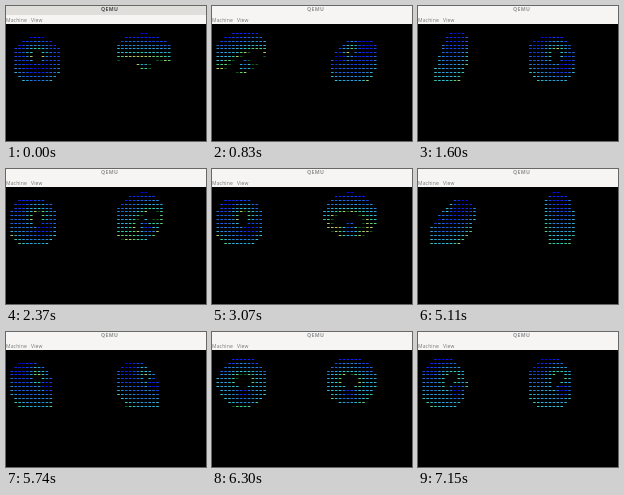
Write an HTML page with a canvas that moves like this. It is 200 px wide and 135 px high and loops after 7.22 s.

```html
<!DOCTYPE html>
<html lang="en">
<head>
<meta charset="utf-8">
<title>QEMU</title>
<style>
  html, body { margin: 0; width: 200px; height: 135px; overflow: hidden; background: #000; }
  body { position: relative; font-family: "Open Sans", "DejaVu Sans", sans-serif; }
  header, nav { position: absolute; left: 0; width: 200px; height: 9px; background: #f6f5f4; white-space: nowrap; }
  header { top: 0; font: bold 5.2px/7px "Open Sans", sans-serif; color: #929292; }
  header.active { background: #e0deda; color: #4a4a4a; }
  header span { position: absolute; left: 95px; letter-spacing: .35px; }
  nav { top: 9px; font-size: 5px; line-height: 11px; color: #777; }
  nav span { position: absolute; top: 0; left: 0; letter-spacing: .15px; }
  nav span + span { left: 25px; }
  canvas { position: absolute; left: 0; top: 18px; }
</style>
</head>
<body>
<header id="bar"><span>QEMU</span></header>
<nav><span>Machine</span><span>View</span></nav>
<canvas id="screen" width="200" height="117"></canvas>
<script>
const LOOP = 7220, STEP = 70, LAST = 102;
const CELL = 3.9, SCALE_X = 9.3, SCALE_Y = 9.4, MID_ROW = 9, TOP_ROW = 1, END_ROW = 14;
const SPIN_A = 0.3, SPIN_B = 0.13;
// dim to bright
const SHADES = ['#0c5a1c', '#b4cc68', '#5cd078', '#30cca4', '#30c4d4', '#2cb4d8',
                '#28a0d8', '#2484dc', '#1c64e4', '#1440ec', '#0c20f0', '#0404e4'];

// poses: [step, tilt, roll]; the left one stalls between steps 33 and 44
const donuts = [
  { x: 31.8, poses: [[0, .22, 3.14], [23, 1.42, 1.88], [33, .42, -1.8], [44, .42, -1.8],
                     [60, .68, .15], [73, 1.25, 2.25], [90, .2, -.25], [102, .64, -1.57]] },
  { x: 138.5, poses: [[0, 1.13, .08], [23, .51, -1.98], [44, .68, .1], [60, .22, -2.2],
                      [73, 1.42, 1.5], [90, .32, .3], [102, .7, -1.57]] }
];

// add whole periods so that the value comes nearest to the expected one
const unwrap = (value, expected, period) =>
  value + Math.round((expected - value) / period) * period;

for (const { poses } of donuts) {
  for (let i = 1; i < poses.length; i++) {
    const [n0, a0, b0] = poses[i - 1], p = poses[i];
    const steps = p[0] === 44 && n0 === 33 ? 0 : p[0] - n0;
    p[1] = unwrap(p[1], a0 + SPIN_A * steps, Math.PI);
    p[2] = unwrap(p[2], b0 + SPIN_B * steps, 2 * Math.PI);
  }
}

function poseAt(poses, n) {
  const i = Math.max(1, poses.findIndex(p => p[0] >= n));
  const [n0, a0, b0] = poses[i - 1], [n1, a1, b1] = poses[i];
  const k = (n - n0) / (n1 - n0);
  return [a0 + (a1 - a0) * k, b0 + (b1 - b0) * k];
}

const ctx = document.getElementById('screen').getContext('2d');
const bar = document.getElementById('bar');

function drawDonut({ x: left, poses }, n) {
  const [a, b] = poseAt(poses, n);
  const sa = Math.sin(a), ca = Math.cos(a), sb = Math.sin(b), cb = Math.cos(b);
  const cells = new Map();
  for (let j = 0; j < 6.28; j += 0.06) {
    const sj = Math.sin(j), cj = Math.cos(j), h = cj + 2;
    for (let i = 0; i < 6.28; i += 0.04) {
      const si = Math.sin(i), ci = Math.cos(i);
      const near = 1 / (si * h * sa + sj * ca + 5);
      const t = si * h * ca - sj * sa;
      const col = Math.floor(SCALE_X * near * (ci * h * cb - t * sb));
      const row = MID_ROW + Math.floor(SCALE_Y * near * (ci * h * sb + t * cb));
      const key = row * 100 + col + 50;
      const seen = cells.get(key);
      if (seen && seen.near >= near) continue;
      const light = 8 * ((sj * sa - si * cj * ca) * cb - si * cj * sa - sj * ca - ci * cj * sb);
      cells.set(key, { near, light, col, row });
    }
  }
  for (const { light, col, row } of cells.values()) {
    if (light <= 0 || row < TOP_ROW || row > END_ROW) continue;
    ctx.fillStyle = SHADES[Math.min(11, Math.floor(light))];
    ctx.fillRect(left + col * CELL, Math.floor(row * CELL + 1.5), 2.6, 1);
  }
}

const start = performance.now();
let shown = -1;

function frame() {
  const ms = (performance.now() - start) % LOOP;
  const n = Math.min(LAST, Math.floor(ms / STEP + 0.2));
  if (n !== shown) {
    shown = n;
    bar.className = n ? '' : 'active';
    ctx.fillStyle = '#000';
    ctx.fillRect(0, 0, 200, 117);
    for (const donut of donuts) drawDonut(donut, n);
  }
  requestAnimationFrame(frame);
}
frame();
</script>
</body>
</html>
```
